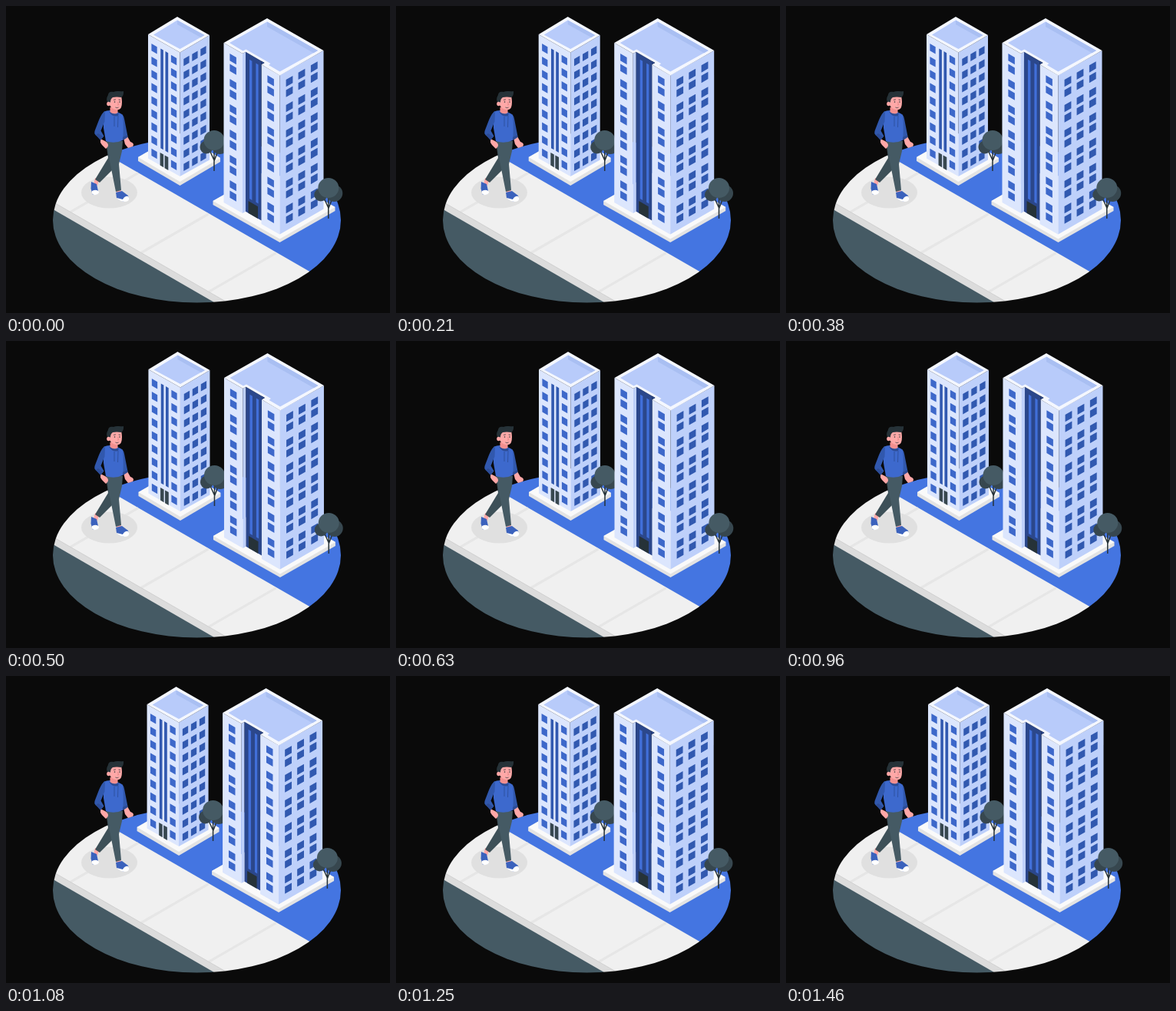
These frames come from a looping animation (500x400 px, 1.5 s). An HTML page:

```html
<!DOCTYPE html>
<html lang="en">
<head>
<meta charset="utf-8">
<style>
html, body { margin: 0; width: 100%; height: 100%; overflow: hidden; background: #0a0a0a; }
svg { display: block; width: 500px; height: 400px; }
</style>
</head>
<body>
<svg viewBox="0 0 500 400">
  <defs>
    <mask id="disc"><ellipse cx="248.5" cy="279" rx="187.5" ry="107.5" fill="#fff"/></mask>
    <g id="tree">
      <path d="M0 39V12M0 25l-5-11M0 26l5-13" fill="none" stroke="#263238" stroke-width="1.5"/>
      <g fill="#37474f">
        <circle cx="-10" cy="8" r="8.500"/>
        <circle cx="7.500" cy="6" r="11"/>
      </g>
      <ellipse cy="-1" rx="13.500" ry="13" fill="#455a64"/>
    </g>
  </defs>

  <g mask="url(#disc)">
    <path d="M50 160h400v240H50z" fill="#4475e1"/>
    <path d="M50 146.800L450 377.600V400H50z" fill="#f0f0f0"/>
    <path d="M84 268.400l88-50.800M176 321.500l87.500-50.500M264 372.300l87.500-50.500" stroke="#e6e6e6" stroke-width="3.200"/>
    <path d="M50 248.800L320 404.600H50z" fill="#dcdcdc"/>
    <path d="M50 248.800L320 404.600" stroke="#c8c8c8" stroke-width=".7"/>
    <path d="M50 258.600L300 402.800V420H50z" fill="#455a64"/>
  </g>

  <g id="town">
    <g id="small">
      <path d="M172 197l54-31 53 32v5l-52.500 31-54.500-32z" fill="#e3e3e3"/>
      <path d="M172 197l54-31 53 32-52.500 31z" fill="#fafafa"/>
      <path d="M185 37l41.500 23.500V222L185 198.500z" fill="#dce6fd"/>
      <path d="M226.500 60.500L265 38v162.500L226.500 222z" fill="#bed0fa"/>
      <path d="M185 37l38-23 42 24-38.500 22.500z" fill="#f4f7ff"/>
      <path d="M192 37.500l31-19L258.500 38l-32 18z" fill="#b8cbfa"/>
      <path d="M223 18.500L258.500 38l-5 3L223 24z" fill="#a9bff2"/>
      <path d="M201.300 55.500l3.600 2.100V187.300l-3.600-2.100zM207.500 59l3.700 2.200V191l-3.700-2.200z" fill="#3159b0"/>
      <path d="M200.600 191l4.500 2.600v16.600l-4.500-2.600zM206.600 194.400l4.700 2.700v16.800l-4.700-2.700z" fill="#37474f"/>
    </g>
    <use href="#tree" x="271" y="176"/>
    <g id="large">
      <path d="M269.500 254l72-41 87 49v5l-72 41-87-49z" fill="#e3e3e3"/>
      <path d="M269.500 254l72-41 87 49-72 41.500z" fill="#fafafa"/>
      <path d="M283.500 48L308 62.100V270l-24.500-14zM332.500 76.300l24 14V297.700l-24-13.700z" fill="#dce6fd"/>
      <path d="M356.500 90l57-32v206.500l-57 33z" fill="#bed0fa"/>
      <path d="M308 62.100l4-2.300v208l-4 2.200z" fill="#bed0fa"/>
      <path d="M312 59.800l20.500 11.900V279.500L312 267.700z" fill="#2b478b"/>
      <path d="M317 69.800l3.400 2V253l-3.400-2zM325.400 74.500l3.200 1.900V257.500l-3.200-1.900z" fill="#416fd9"/>
      <path d="M315.500 254l12.500 7.200v15.700l-12.500-7.200z" fill="#263238"/>
      <path d="M283.500 48L340 16l73.500 42-57 32.500-24-14.200 4-2.300L312 59.800l-4 2.300z" fill="#f4f7ff"/>
      <path d="M332.500 76.300l4-2.300-4-2.300z" fill="#2b478b"/>
      <path d="M291 48l49-27.500L406 58l-49.500 27.500-14.500-8.500 2.500-2L312.500 56.500l-4 2z" fill="#b8cbfa"/>
      <path d="M340 20.500L406 58l-5.500 3.200L340 27z" fill="#a9bff2"/>
    </g>
    <use href="#tree" x="419.800" y="238"/>
  </g>

  <g id="walker">
    <ellipse cx="134.500" cy="243" rx="36.500" ry="20.500" fill="#e0e0e0"/>
    <path d="M116 224l5 3-2 7-5-2zM143 239l6-1 2 7-6 1z" fill="#ffa8a7"/>
    <path d="M111 229l7 3 2 9-1 4-6 1-2.500-8z" fill="#3b62bd"/>
    <path d="M112 241q6-3 9 1c0 4-7 6-9 2z" fill="#fff"/>
    <path d="M143 243l8-2 8 6 1 5-7 3-9-5z" fill="#3b62bd"/>
    <path d="M152 252q3-5 7-4c3 4 0 7-4 7q-6 0-11-5z" fill="#fff"/>
    <path d="M130 177l3 21-17 28 6 4 17-17 5-32z" fill="#3d5058"/>
    <path d="M130.500 176h21.500l-1 13-4 17 3 34-7 2-8-40z" fill="#455a64"/>
    <path d="M123 173l6 3c4 3 5 5 3 8l-2 2-5-5-2-3zM153 172l5-2 4 7c3 1 4 2 4 4l-1 2-6 2-4-5z" fill="#ffa8a7"/>
    <path d="M146 139q7 1 8 8l4.500 23-6 4-5-15z" fill="#3158ad"/>
    <path d="M127 138q8-4 18 0l7 4c1 12 1 23 0 33q-11 5-22 1l-3-17z" fill="#3d69cd"/>
    <path d="M129 137c-6 3-9 15-13.500 26q-1 3 1 5l7 6.500 4-5-4-7 5-12z" fill="#3158ad"/>
    <path d="M117 168l3-2 6 4-3 5zM152 171l6-3 .5 3-6 4z" fill="#2c4c96"/>
    <path d="M135.500 132h10v7q-5 4-10 0z" fill="#f28f8f"/>
    <path d="M134 137q7 6 13 2l-1 4q-7 2-11-4z" fill="#2c4c96"/>
    <path d="M141 144v13M146 143l-.5 15" stroke="#2c4c96" stroke-width=".8"/>
    <path d="M135 117h15q2 9 0 15-2 4-7 3-6-1-8-6z" fill="#ffa8a7"/>
    <path d="M131.500 124c-1-3 0-6 1.500-8 0-4 4-5 7-4 4-2 8 0 13-1 .5 4-1 7-3 8q-6-1-11 0-3 2-3 6l-3 3z" fill="#263238"/>
    <ellipse cx="133.500" cy="127.500" rx="2.300" ry="2.800" fill="#ffa8a7"/>
    <path d="M140 122.500l3-.7M146.500 122l2.500.5M142.500 132q2 1.500 4 0" fill="none" stroke="#263238" stroke-width=".7"/>
    <path d="M145.500 125l1 4h-1.500" fill="none" stroke="#e37b7b" stroke-width=".7"/>
    <circle cx="141.500" cy="125" r=".8" fill="#263238"/>
    <circle cx="148" cy="125" r=".8" fill="#263238"/>
  </g>
</svg>
<script>
const SLOPE = 0.577;
const $ = id => document.getElementById(id);

// Rows of skewed panes; dir is 1 on left faces and -1 on right faces.
function addWindows(parent, columns, rows, dir, width, fill) {
  const [x0, y0] = columns.start, rise = dir * SLOPE;
  let d = '';
  for (const dx of columns.offsets)
    for (const dy of rows)
      d += `M${x0 + dx} ${y0 + dx * rise + dy}l${width} ${width * rise}v9.3l${-width} ${-width * rise}z`;
  const path = document.createElementNS('http://www.w3.org/2000/svg', 'path');
  path.setAttribute('d', d);
  path.setAttribute('fill', fill);
  $(parent).append(path);
}

const even = Array.from({ length: 9 }, (_, i) => i * 17.1);
const paired = Array.from({ length: 12 }, (_, i) => (i >> 1) * 33 + (i % 2) * 13.5);
addWindows('small', { start: [189.4, 49], offsets: [0, 25.5] }, even, 1, 7.3, '#3d68ca');
addWindows('small', { start: [231.3, 69], offsets: [0, 11, 22] }, even, -1, 7.3, '#3159b0');
addWindows('large', { start: [291.4, 62], offsets: [0, 49] }, paired, 1, 8.5, '#3d68ca');
addWindows('large', { start: [364.6, 96], offsets: [0, 16, 32.3] }, paired, -1, 8.8, '#3159b0');

// Standard ease curve, cubic-bezier(.25, .1, .25, 1).
function ease(x) {
  let lo = 0, hi = 1, s;
  for (let i = 0; i < 20; i++) {
    s = (lo + hi) / 2;
    const bx = 0.75 * s * (1 - s) + s ** 3;
    if (bx < x) lo = s; else hi = s;
  }
  return 0.3 * s * (1 - s) ** 2 + 3 * s * s * (1 - s) + s ** 3;
}

const LOOP = 1500;
const REACH = 2 / 3;
const SHAKE = [0, -1, 2, -4, 4, -4, 4, -4, 2, -1, 0];

function draw() {
  const step = performance.now() % LOOP / LOOP * 10;
  const i = Math.floor(step);
  const x = REACH * (SHAKE[i] + (SHAKE[i + 1] - SHAKE[i]) * ease(step - i));
  $('town').setAttribute('transform', `translate(${x.toFixed(3)} 0)`);
  requestAnimationFrame(draw);
}
draw();
</script>
</body>
</html>
```
